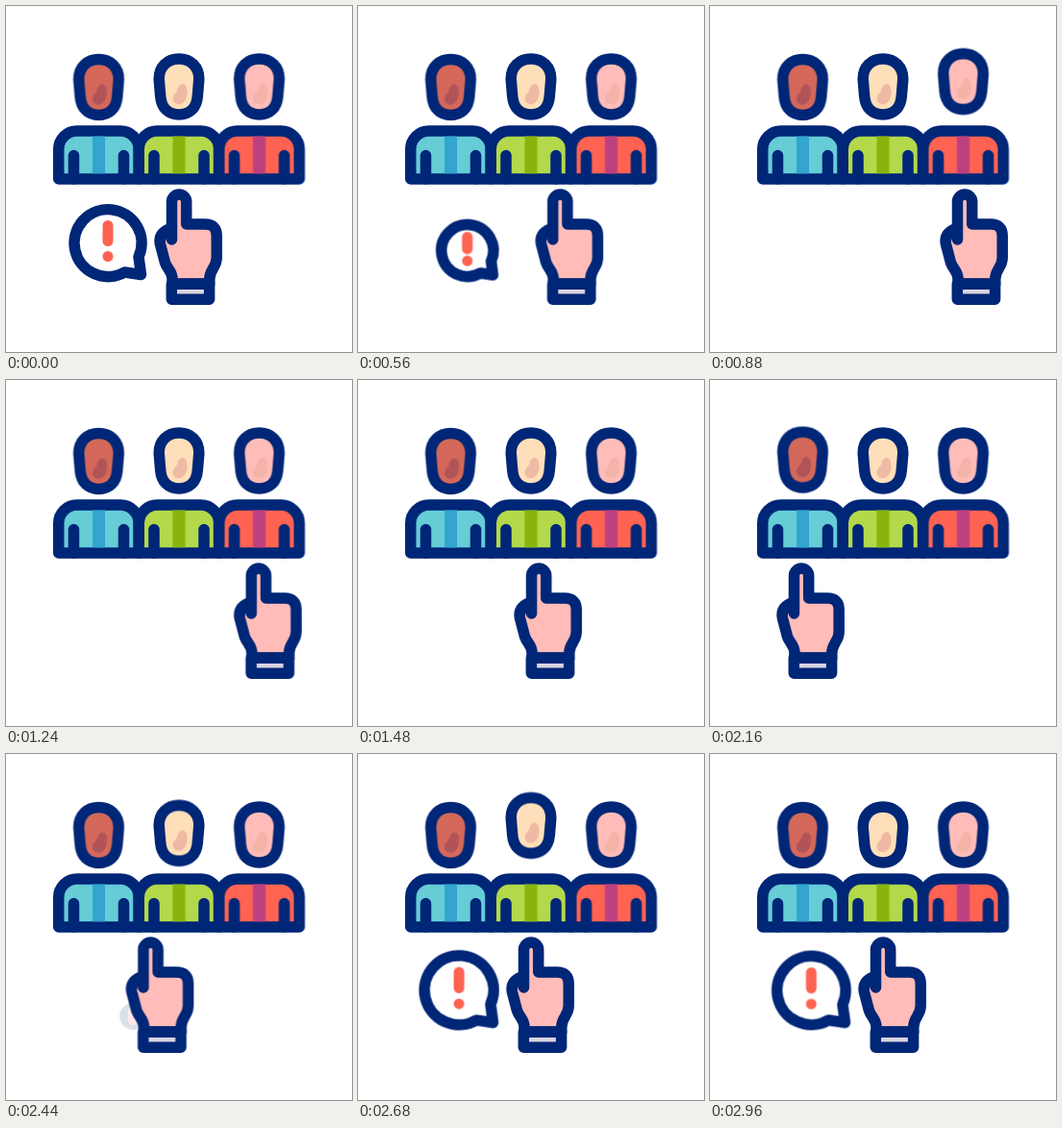
An HTML page without scripts for the animation above (3 s loop, 360x360 px).

```html
<!DOCTYPE html>
<html lang="en">
<head>
<meta charset="utf-8">
<title>Choosing a candidate</title>
<style>
  html, body { margin: 0; height: 100%; overflow: hidden; background: #fff; }
  svg { display: block; width: 100vw; height: 100vh; }

  .line { stroke: #002677; stroke-width: 11.5; stroke-linecap: round; stroke-linejoin: round; }

  .head, .hand, .bubble {
    animation: 3s cubic-bezier(.333, 0, .667, 1) infinite;
  }
  .head { animation-name: hop; animation-delay: var(--at); }
  .hand { animation-name: point; }
  .bubble { animation-name: pop; transform-origin: 140px 281px; }
  .bubble path { vector-effect: non-scaling-stroke; }

  @keyframes hop {
    0%, 13.333%, 100% { transform: none; }
    6.667% { transform: translateY(-15px); }
  }
  @keyframes point {
    0%, 13.333%, 86.667%, 100% { transform: translateX(0); }
    26.667%, 40% { transform: translateX(85px); }
    60%, 73.333% { transform: translateX(-85px); }
  }
  @keyframes pop {
    0%, 6.667%, 100% { transform: scale(1); }
    13.333%, 93.333% { transform: scale(1.2); }
    26.667%, 76.667% { transform: scale(0); }
    0%, 20%, 86.667%, 100% { opacity: 1; }
    26.667%, 79.667% { opacity: 0; }
  }
</style>
</head>
<body>
<svg viewBox="0 0 360 360">
  <defs>
    <!-- Parts are centred on x = 0 -->
    <path id="head" class="line" d="M-20.800 76C-20.800 63-12 55 0 55S20.800 63 20.800 76L19.300 94C18.300 106 11 113 0 113S-18.300 106-19.300 94Z"/>
    <path id="shade" d="M1 82C6 79 9 84 8.500 91C8 99 3 103-2 102C-7 101-8 94-4 91C-1 89-2 84 1 82Z"/>
    <path id="torso" class="line" d="M-41.750 180V149a19 19 0 0 1 19-19H22.750a19 19 0 0 1 19 19V180Z"/>
    <path id="stripe" d="M-6.500 135.500h13v38.800h-13z"/>
    <path id="arms" class="line" fill="none" d="M-26 155.500V180M26 155.500V180"/>
  </defs>

  <g transform="translate(96.500)">
    <use href="#torso" fill="#66ccd6"/>
    <use href="#stripe" fill="#33a5d0"/>
    <use href="#arms"/>
    <g class="head" style="--at:1.8s">
      <use href="#head" y=".5" fill="#d4685a"/>
      <use href="#shade" y=".5" fill="#b25358"/>
    </g>
  </g>
  <g transform="translate(180)">
    <use href="#torso" fill="#b3d84a"/>
    <use href="#stripe" fill="#8ab40c"/>
    <use href="#arms"/>
    <g class="head" style="--at:2.4s">
      <use href="#head" fill="#ffdfba"/>
      <use href="#shade" fill="#efb9a4"/>
    </g>
  </g>
  <g transform="translate(263.500)">
    <use href="#torso" fill="#ff6352"/>
    <use href="#stripe" fill="#bd4082"/>
    <use href="#arms"/>
    <g class="head" style="--at:.8s">
      <use href="#head" fill="#ffbcb8"/>
      <use href="#shade" fill="#f4b3a6"/>
    </g>
  </g>

  <g class="bubble">
    <path class="line" fill="#fff" d="M138 261L140.500 279.500L123.500 277A35 35 0 1 1 138 261Z"/>
    <path d="M106 228.500V244.500M106 260.500v.01" stroke="#ff6352" stroke-width="11" stroke-linecap="round"/>
  </g>

  <g class="hand">
    <path class="line" fill="#ffbcb8" d="M172.500 243V203.600a7.600 7.600 0 0 1 15.200 0V227H207Q219.200 227 219.200 239V262C219.200 272 211.800 274 211.800 284V289H173V284C173 276 168 274 165.500 267L160.500 248Q158 236 172.500 231"/>
    <rect class="line" x="172.300" y="289.300" width="39.300" height="16" fill="#d9d4e2"/>
  </g>
</svg>
</body>
</html>
```
